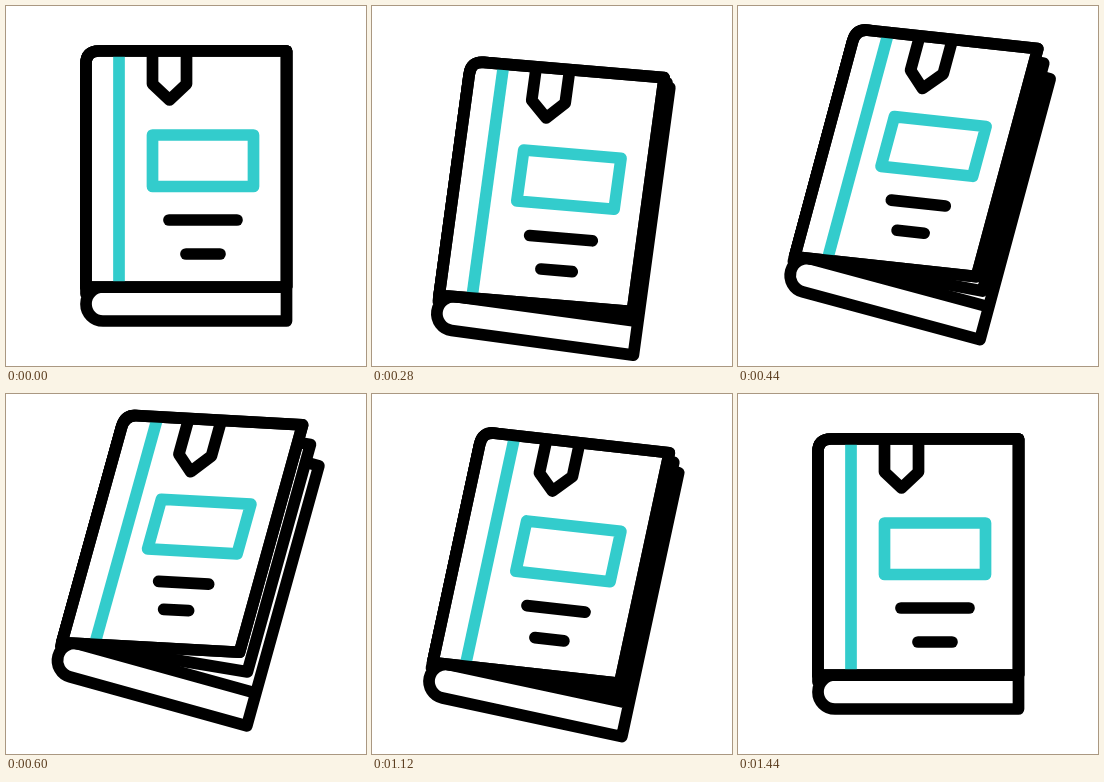
Animation of 360x360 px, one loop 1.48 s. Source, as an HTML page with a canvas:

```html
<!DOCTYPE html>
<html lang="en">
<head>
<meta charset="utf-8">
<title>Opening book</title>
<style>
  html, body { margin: 0; width: 100%; height: 100%; overflow: hidden; background: #fff; }
  canvas { display: block; width: 360px; height: 360px; }
</style>
</head>
<body>
<canvas id="stage"></canvas>
<script>
const canvas = document.getElementById('stage');
const ctx = canvas.getContext('2d');
const density = window.devicePixelRatio || 1;
canvas.width = canvas.height = 360 * density;

const LOOP = 1480, STEP = 40;
const TILT = 15.5 * Math.PI / 180, DROP = 24, LIFT = -5;
const BLACK = '#000', TEAL = '#33cccc';
const LEFT = 80, RIGHT = 280.5, TOP = 45, HINGE = 281, BOTTOM = 315;
const CORNER = 13;

const lerp = (a, b, t) => a + (b - a) * t;
const ease = (from, to, x) => {
  const t = Math.min(1, Math.max(0, (x - from) / (to - from)));
  return t * t * (3 - 2 * t);
};

// Opening narrows a sheet toward the spine and slants its free side upward.
const fold = t => ([x, y]) => {
  const reach = x - LEFT;
  return [x - 0.133 * reach * t, y + (3 - 0.19 * reach) * t];
};
const scale = (px, py, k) => ([x, y]) => [px + (x - px) * k, py + (y - py) * k];
const shift = dx => ([x, y]) => [x + dx, y];

const box = (l, t, r, b) => [[l, t], [r, t], [r, b], [l, b]];
const bar = (y, half) => [[180 - half + 17, y], [180 + half + 17, y]];
const sheet = box(LEFT, TOP, RIGHT, HINGE);
const label = box(146.5, 129, 247.5, 180.5);
const band = [[113, TOP], [113, HINGE]];
const ribbon = [[-17, 0], [-17, 33], [0, 49], [17, 33], [17, 0]]
  .map(([x, y]) => [163.5 + x, TOP + y]);
const bars = [bar(214, 34), bar(248, 17)];

function polyline(points, closed) {
  const path = new Path2D();
  points.forEach(p => path.lineTo(...p));
  if (closed) path.closePath();
  return path;
}

// Sheet outline with a rounded top corner at the spine.
function sheetPath(t) {
  const bend = fold(t);
  const path = new Path2D();
  path.moveTo(...bend([LEFT, TOP + CORNER]));
  path.quadraticCurveTo(...bend([LEFT, TOP]), ...bend([LEFT + CORNER, TOP]));
  sheet.slice(1).forEach(p => path.lineTo(...bend(p)));
  path.closePath();
  return path;
}

// Spine edge plus the back cover with its round lower end.
function backPath() {
  const radius = (BOTTOM - HINGE) / 2, middle = HINGE + radius;
  const path = polyline([[LEFT, 288], [LEFT, 60]]);
  path.moveTo(LEFT + 20, TOP);
  path.lineTo(RIGHT, TOP);
  path.lineTo(RIGHT, BOTTOM);
  path.arc(LEFT + radius, middle, radius, Math.PI / 2, Math.PI * 1.5);
  path.lineTo(RIGHT, HINGE);
  return path;
}
const back = backPath();

function stroke(path, color = BLACK) {
  ctx.strokeStyle = color;
  ctx.stroke(path);
}

function drawSheet(path) {
  ctx.fill(path);
  stroke(path);
}

function draw(step) {
  const angle = TILT * ease(2, 12, step);
  const rise = step < 6 ? DROP * ease(2, 6, step) : lerp(DROP, LIFT, ease(6, 12, step));
  const open = ease(3, 15, step);
  const bend = fold(open);

  ctx.setTransform(density, 0, 0, density, 0, 0);
  ctx.fillStyle = '#fff';
  ctx.fillRect(0, 0, 360, 360);
  ctx.translate(180, 180 + rise);
  ctx.rotate(angle);
  ctx.translate(-180, -180);
  ctx.lineWidth = 11.7;
  ctx.lineJoin = ctx.lineCap = 'round';

  stroke(back);
  drawSheet(sheetPath(open * 0.52));
  const cover = sheetPath(open);
  drawSheet(cover);

  ctx.lineCap = 'butt';
  stroke(polyline(band.map(bend).map(shift(3.5 * open))), TEAL);
  const grow = scale(163.5, TOP, 1 + 0.08 * open);
  stroke(polyline(ribbon.map(grow).map(bend).map(shift(6 * open))));
  ctx.lineCap = 'round';
  stroke(cover);
  stroke(polyline(label.map(bend), true), TEAL);
  const shrink = scale(197, 209, 1 - 0.17 * open);
  bars.forEach(points => stroke(polyline(points.map(shrink).map(bend))));
}

function tick() {
  const k = Math.floor(performance.now() % LOOP / STEP);
  // Open, hold, then run the same steps backwards.
  draw(k < 25 ? Math.min(k, 15) : 37 - k);
  requestAnimationFrame(tick);
}
tick();
</script>
</body>
</html>
```
